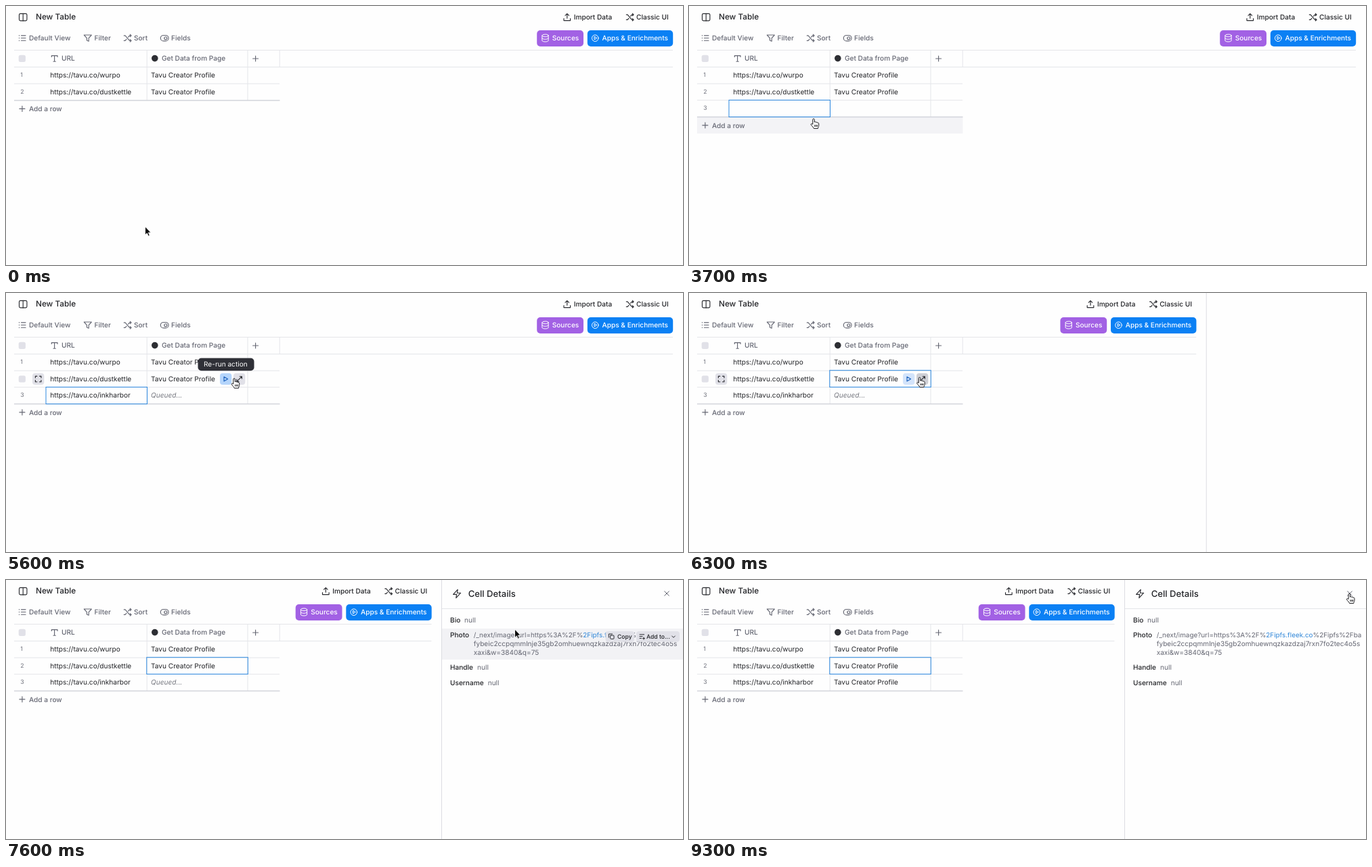
Recreate the animation shown at these times as an HTML page. Size 1000x384 px, loop 9400 ms.

```html
<!DOCTYPE html>
<html lang="en">
<head>
<meta charset="utf-8">
<title>New Table</title>
<style>
  html, body { margin: 0; width: 100%; height: 100%; overflow: hidden; background: #fefefe; }
  svg { display: block; width: 100vw; height: 100vh; }
  text { font: 400 10.1px Inter, "Liberation Sans", sans-serif; fill: #222327; text-rendering: geometricPrecision; }
  .mid { font-weight: 500; }
  .gray { fill: #646672; }
  .num { font-size: 8.7px; fill: #6f717c; }
  .small { font-size: 8.6px; font-weight: 500; }
  .white { fill: #fff; }
  .link { fill: #2f86d8; }
  .queued { font-style: italic; fill: #75777f; }
  .icon { fill: none; stroke: #2b2c31; stroke-width: 1.15; stroke-linecap: round; stroke-linejoin: round; }
  .icon.soft { stroke: #646672; }
  .icon.light { stroke: #fff; stroke-width: 1; }
  .rule { fill: none; stroke: #e4e5e9; }
  .box { fill: #e1e1e8; }
  .pick { fill: none; stroke: #2f8ae0; }
</style>
</head>
<body>
<svg viewBox="0 0 1000 384">
  <defs>
    <path id="shuffle" d="M0 1.5H1.8L8.2 9H10.6M0 9H1.8L3.7 6.8M6.2 3.8 8.2 1.5H10.6M9-.2 10.8 1.5 9 3.2M9 7.3 10.8 9 9 10.7"/>
    <path id="plus" d="M-4 0H4M0-4V4"/>
    <path id="play" d="M-2.3-3.3V3.3L3.3 0Z"/>
  </defs>

  <!-- top bar -->
  <g class="icon"><rect x="19.5" y="11.3" width="11.4" height="10.6" rx="1.8"/><path d="M25.2 11.3V21.9"/></g>
  <text class="mid" x="44" y="20.4" style="font-size:11.75px">New Table</text>

  <!-- toolbar -->
  <g class="icon soft">
    <path d="M22.5 43.8H29M22.5 47.5H29M22.5 51.2H29M19.3 43.8H19.8M19.3 47.5H19.8M19.3 51.2H19.8"/>
    <path d="M115.3 43H126.3L122.2 47.7V52.2L119.4 51V47.7Z"/>
    <use href="#shuffle" x="174.3" y="42.4"/>
    <rect x="228.3" y="43.5" width="11.8" height="8.4" rx="4.2"/><circle cx="235.8" cy="47.7" r="2"/>
  </g>
  <g>
    <text class="mid gray" x="34" y="51.2">Default View</text>
    <text class="mid gray" x="130.5" y="51.2">Filter</text>
    <text class="mid gray" x="189" y="51.2">Sort</text>
    <text class="mid gray" x="244" y="51.2">Fields</text>
  </g>

  <!-- right-hand actions -->
  <g id="actions">
    <g class="icon">
      <path d="M824 18.5V21.6H833.6V18.5M828.8 18.2V11.6M826 14.2 828.8 11.4 831.6 14.2"/>
      <use href="#shuffle" x="916.3" y="11.3"/>
    </g>
    <text class="mid" x="838.7" y="20.2">Import Data</text>
    <text class="mid" x="931" y="20.2">Classic UI</text>
    <rect x="784.2" y="36" width="68.8" height="24" rx="5" fill="#a261e4"/>
    <g class="icon light">
      <ellipse cx="796.5" cy="43.8" rx="4.6" ry="1.8"/>
      <path d="M791.9 43.8V51.2C791.9 53.6 801.1 53.6 801.1 51.2V43.8M791.9 47.6C791.9 50 801.1 50 801.1 47.6"/>
    </g>
    <text class="mid white" x="806.7" y="51.2">Sources</text>
    <rect x="858.8" y="36" width="126.4" height="24" rx="5" fill="#0b80f4"/>
    <g class="icon light"><circle cx="870.3" cy="47.7" r="4.8"/><path d="M869 45.6V49.8L872.5 47.7Z"/></g>
    <text class="mid white" x="880.6" y="51.2">Apps &amp; Enrichments</text>
  </g>

  <!-- table -->
  <path id="rules" class="rule"/>
  <path class="rule" d="M12 115.2H404M208.2 66V140M357 66V140M404.2 66V90"/>
  <rect class="box" x="18.7" y="72.7" width="10.2" height="10.2" rx="2.5"/>
  <path class="icon soft" d="M67.3 75.5V73.6H76V75.5M71.6 73.6V82.2M70 82.2H73.3"/>
  <text class="mid gray" x="82" y="81.2">URL</text>
  <circle cx="219.8" cy="77.6" r="4.8" fill="#2d2e33"/>
  <text class="mid gray" x="230" y="81.2">Get Data from Page</text>
  <use class="icon soft" href="#plus" x="368.6" y="78"/>

  <text class="num" x="21.3" y="105.3">1</text>
  <text x="65.2" y="106.4">https://tavu.co/wurpo</text>
  <text x="214" y="106.4">Tavu Creator Profile</text>
  <text class="num" x="21.3" y="130">2</text>
  <text x="65.2" y="131">https://tavu.co/dustkettle</text>
  <text x="214" y="131">Tavu Creator Profile</text>
  <g id="row3">
    <path class="rule" d="M12 139.7H404M208.2 140V164.5M357 140V164.5"/>
    <text class="num" x="21.3" y="154.3">3</text>
    <text id="pasted" x="65.2" y="155.3">https://tavu.co/inkharbor</text>
    <text id="queued" class="queued" x="214" y="155.3">Queued...</text>
    <text id="done" x="214" y="155.3">Tavu Creator Profile</text>
  </g>
  <g id="foot">
    <rect id="addHover" x="12" y="140.4" width="392.5" height="24.2" fill="#f3f3f6"/>
    <path class="rule" d="M12 140H404.5" style="stroke:#d2d4da;stroke-width:1.5"/>
    <use class="icon soft" href="#plus" x="23.9" y="152.4"/>
    <text class="mid gray" x="34" y="156">Add a row</text>
  </g>

  <g id="rowHover">
    <rect x="14" y="-8" width="20" height="16" fill="#fefefe"/>
    <rect class="box" x="18.7" y="-5.1" width="10.2" height="10.2" rx="2.5"/>
    <rect class="box" x="39" y="-8.5" width="17.3" height="17" rx="4"/>
    <path class="icon" d="M43.4-1.8V-4.2H45.8M49.5-4.2H51.9V-1.8M51.9 1.8V4.2H49.5M45.8 4.2H43.4V1.8"/>
    <rect id="run" x="316" y="-8.5" width="17.3" height="17" rx="4"/>
    <use class="icon" href="#play" x="324.3" style="stroke:#1c62bd"/>
    <rect id="expand" x="336" y="-8.5" width="17.3" height="17" rx="4"/>
    <path class="icon" d="M341 3.6 348.2-3.6M345.2-3.8H348.4V-.6M340.8.6V3.8H344"/>
  </g>
  <rect id="pickUrl" class="pick" x="59" y="139.5" width="149.5" height="25"/>
  <rect id="pickData" class="pick" x="207.8" y="114.7" width="149.5" height="24.8"/>

  <g id="tip">
    <rect x="283.5" y="96.6" width="83" height="18.6" rx="5" fill="#2f3037"/>
    <text class="white" x="292" y="109.4">Re-run action</text>
  </g>

  <!-- details panel -->
  <g id="panel">
    <path d="M643.5 0H1002V384H643.5Z" fill="#fefefe"/>
    <path class="rule" d="M643.5 0V384" style="stroke:#dcdde2"/>
    <g id="details">
      <path class="rule" d="M644 42.5H1000"/>
      <rect id="photoHover" x="644" y="72" width="356" height="46" fill="#f2f2f5"/>
      <path class="icon" d="M667.2 14.2 660.6 21.4H665.6L664.8 26.6 671.6 19.2H666.5Z"/>
      <text class="mid" x="682.7" y="24.8" style="font-size:13.1px">Cell Details</text>
      <path class="icon soft" d="M972.7 16.7 979.3 23.3M979.3 16.7 972.7 23.3" style="stroke-width:1"/>
      <text class="mid" x="656" y="63.4">Bio</text><text class="gray" x="677" y="63.4">null</text>
      <text class="mid" x="656" y="84.9">Photo</text>
      <text class="gray" x="690.7" y="84.9" style="font-size:9.9px">/_next/image?url=https%3A%2F%<tspan class="link">2Fipfs.fleek.co</tspan>%2Fipfs%2Fba</text>
      <text class="gray" x="690.7" y="98">fybeic2ccpqmmlnje35gb2omhuewnqzkazdzaj7rxn7fo2tec4o5s</text>
      <text class="gray" x="690.7" y="111.2">xaxi&amp;w=3840&amp;q=75</text>
      <text class="mid" x="656" y="132.5">Handle</text><text class="gray" x="696" y="132.5">null</text>
      <text class="mid" x="656" y="156.3">Username</text><text class="gray" x="711.7" y="156.3">null</text>
      <g id="photoTools">
        <rect class="box" x="885.5" y="76" width="42.5" height="15.8" rx="4"/>
        <rect class="box" x="931" y="76" width="64" height="15.8" rx="4"/>
        <g class="icon" style="stroke-width:1">
          <rect x="892.6" y="82" width="5.4" height="5.4" rx="1"/>
          <path d="M890.4 85.2V80H895.6M936 80.8H942.6M936 83.6H940M936 86.4H938.6M940.4 86.6H943.6M942 85V88.2M983.7 83 986 85.3 988.3 83"/>
        </g>
        <text class="small" x="903" y="87">Copy</text>
        <text class="small" x="946" y="87">Add to...</text>
      </g>
    </g>
  </g>

  <!-- pointer -->
  <g id="pointer" stroke-linejoin="round">
    <path id="arrow" d="M0 0V12.4L2.8 9.8 4.7 14.2 6.8 13.3 4.9 9H8.7Z" fill="#0b0b0b" stroke="#fff" stroke-width=".9"/>
    <path id="hand" d="M-1.2 8.4V1.4C-1.2-.3 1.3-.3 1.3 1.4V5.2C1.8 4.3 3.5 4.5 3.6 5.6 4.2 4.9 5.7 5.2 5.8 6.3 6.5 5.8 7.7 6.2 7.7 7.4V10.2C7.7 11.8 6.6 12.6 6.5 14.6H.3C-.2 12.6-2.4 11.2-3.7 9.1-4.4 7.8-2.8 6.8-1.2 8.4ZM1.7 9.2V12M3.6 9.2V12M5.4 9.2V12" fill="#fff" stroke="#17171a" stroke-width="1"/>
  </g>
</svg>
<script>
const LOOP = 9400, STEP = 100;
const ROW_TOP = 90.7, ROW = 24.5, PANEL = 356.5;

// time, x, y
const path = [
  [0, 205.5, 327], [100, 160, 286], [200, 105, 236], [300, 74, 207], [400, 74, 207],
  [600, 68, 168], [800, 66, 152], [1000, 66, 152], [1500, 95.5, 147.5], [1900, 112, 146],
  [2500, 130, 146], [3600, 130, 146], [3700, 184, 167], [3900, 187, 182], [4100, 187, 182],
  [4700, 286, 152], [4800, 286, 152], [5400, 329, 128], [5600, 337, 126.5], [5900, 340.5, 125],
  [6800, 340.5, 125], [7600, 751.5, 73], [7900, 790, 80], [8300, 850, 84], [8800, 884, 68],
  [9300, 975.3, 20]
];

const $ = Object.fromEntries([...document.querySelectorAll('[id]')].map(el => [el.id, el]));
const show = (el, on) => { el.style.display = on ? '' : 'none'; };
const move = (el, x, y) => el.setAttribute('transform', `translate(${x} ${y})`);

function pointerAt(t) {
  const i = path.findIndex(p => p[0] > t);
  if (i < 0) return path[path.length - 1].slice(1);
  const [t0, x0, y0] = path[i - 1], [t1, x1, y1] = path[i];
  const k = (t - t0) / (t1 - t0), e = k * k * (3 - 2 * k);
  return [x0 + (x1 - x0) * e, y0 + (y1 - y0) * e];
}

function render(t) {
  const [x, y] = pointerAt(t);
  const rows = t >= 1000 ? 3 : 2;
  const row = Math.floor((y - ROW_TOP) / ROW);
  const inTable = x > 12 && x < 404;
  const onRow = inTable && row >= 0 && row < rows;
  const onAdd = inTable && row === rows;
  const onButton = onRow && x > 316 && x < 353;
  const onClose = x > 966 && y < 30;
  const onPhoto = t >= 6800 && x > 644 && y > 72 && y < 118;

  show($.row3, rows === 3);
  show($.pasted, t >= 4200);
  show($.queued, t >= 4500 && t < 8200);
  show($.done, t >= 8200);
  move($.foot, 0, (rows - 2) * ROW);
  show($.addHover, onAdd);

  show($.rowHover, onRow);
  move($.rowHover, 0, 103 + row * ROW);
  $.run.setAttribute('fill', t >= 5200 && t < 5700 ? '#b5d5fb' : '#d3e4fb');
  $.expand.setAttribute('fill', onButton && x > 338 ? '#cecfd5' : '#e1e1e8');
  show($.tip, t >= 5400 && t < 5800);
  show($.pickUrl, t >= 2000 && t < 5900);
  show($.pickData, t >= 5900);

  const k = Math.min(1, Math.max(0, (t - 6100) / 500));
  const shift = PANEL * (1 - Math.pow(1 - k, 2.12));
  move($.actions, -shift, 0);
  $.rules.setAttribute('d', `M12 65.5H${985 - shift}M12 90.5H${985 - shift}`);
  show($.panel, shift > 0);
  move($.panel, PANEL - shift, 0);
  show($.details, t >= 6700);
  show($.photoHover, onPhoto);
  show($.photoTools, onPhoto);

  const hand = onAdd || onButton || onClose;
  show($.hand, hand);
  show($.arrow, !hand);
  move($.pointer, x, y);
}

const start = performance.now();
function tick() {
  const t = (performance.now() - start) % LOOP;
  render(Math.floor(t / STEP) * STEP);
  requestAnimationFrame(tick);
}
tick();
</script>
</body>
</html>
```
